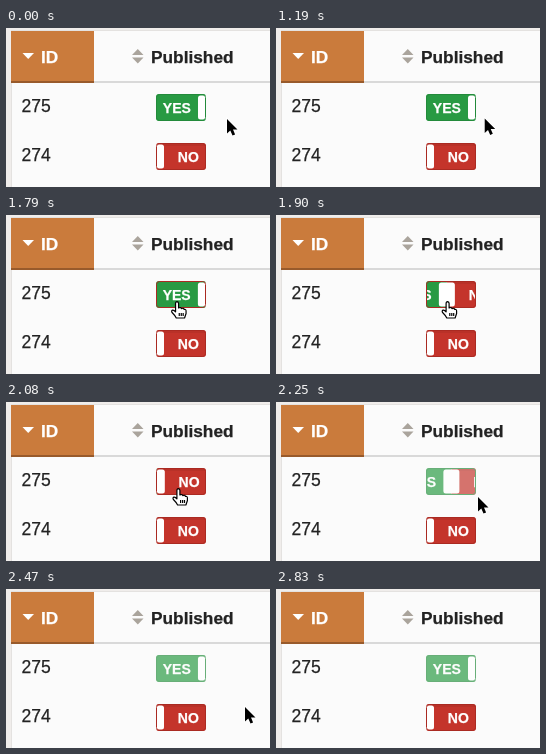
An HTML page for the animation above (4170 ms loop, 264 by 159 pixels).

```html
<!DOCTYPE html>
<html lang="en">
<head>
<meta charset="utf-8">
<title>Published toggle</title>
<style>
  html, body { margin: 0; width: 100%; height: 100%; overflow: hidden; }
  svg { display: block; width: 264px; height: 159px; }
  text { font: 17.5px "Liberation Sans", Arial, sans-serif; fill: #222; stroke: #222; stroke-width: .25px; }
  .head { font-size: 17.3px; font-weight: bold; }
  .label { font-size: 14px; font-weight: bold; }
  .white { fill: #fff; stroke: #fff; }
</style>
</head>
<body>
<svg viewBox="0 0 264 159">
  <defs>
    <clipPath id="pill"><rect width="50" height="27" rx="3"/></clipPath>
    <g id="slider">
      <rect x="-10" width="60" height="27" fill="#289a43"/>
      <rect x="50" width="60" height="27" fill="#c4342b"/>
      <rect x="50" width="60" height="3" fill="#000" opacity=".06"/>
      <text class="label white" x="6.8" y="18.5">YES</text>
      <text class="label white" x="71.8" y="18.5">NO</text>
      <rect x="42" y="1.5" width="16" height="24" rx="2.5" fill="#fff"/>
    </g>
  </defs>

  <rect width="264" height="159" fill="#f0edeb"/>
  <rect x="5" y="2" width="259" height="157" fill="#e4e2e0"/>
  <rect x="6" y="3" width="258" height="156" fill="#fbfbfb"/>
  <rect x="6" y="53" width="258" height="2" fill="#d9d9d9"/>
  <rect x="5" y="3" width="83" height="50" fill="#ca7b3c"/>
  <rect x="5" y="53" width="83" height="2" fill="#985a2b"/>

  <path d="M16.5 25H28L22.2 31Z" fill="#fff"/>
  <path d="M126 27H137.5L131.8 21ZM126 29.5H137.5L131.8 35.5Z" fill="#aaa49c"/>
  <text class="head white" x="35" y="35">ID</text>
  <text class="head" x="145" y="35">Published</text>
  <text x="15.6" y="84">275</text>
  <text x="15.6" y="133">274</text>

  <g id="first" transform="translate(150 66)">
    <g clip-path="url(#pill)"><use href="#slider" id="slide"/></g>
    <rect id="edge" x=".5" y=".5" width="49" height="26" rx="3" fill="none"/>
  </g>
  <g transform="translate(150 115)">
    <g clip-path="url(#pill)"><use href="#slider" x="-50"/></g>
    <rect x=".5" y=".5" width="49" height="26" rx="3" fill="none" stroke="#aa2a22"/>
  </g>

  <g id="cursor">
    <path id="arrow" d="M0 0V14.5L3.3 11.5L5.5 16.5L8.1 15.4L6 10.5H10.5Z"
      fill="#000" stroke="#fff" stroke-width="1.6" paint-order="stroke"/>
    <path id="hand" d="M-2 9V1.5Q-2-.3-.5-.3Q1 0 1 1.5V6Q3.3 4.8 3.9 6.6Q6.1 5.6 6.5 7.5Q8.5 7 8.5 9V11.5L7 16H-1.3Q-2.7 13.2-5.5 10.5Q-6.5 8.8-5 8.1Q-3.7 7.7-2 9.8ZM1.7 11V14M3.7 11V14M5.6 11V14"
      fill="#fff" stroke="#000" stroke-width="1.2" stroke-linejoin="round"/>
  </g>
</svg>
<script>
const LOOP = 4170, MOVE_AT = 1190, STEP = 58;
const SLIDE = 350, OFF_AT = 1768, ON_AT = 2130;
const $ = id => document.getElementById(id);

// Pointer path: time, x, y
const path = [[1070, 221, 91], [1480, 179, 89], [1650, 171, 87],
  [2080, 173, 87], [2234, 202, 95], [2466, 239, 118], [2814, 227, 163]];

function pointer(t) {
  const last = path.length - 1;
  const i = path.findIndex(p => p[0] > t);
  if (i < 1) return path[i ? last : 0].slice(1);
  const a = path[i - 1], b = path[i], k = (t - a[0]) / (b[0] - a[0]);
  return [a[1] + (b[1] - a[1]) * k, a[2] + (b[2] - a[2]) * k];
}

// CSS "ease": cubic-bezier(.25, .1, .25, 1)
function ease(x) {
  if (x <= 0) return 0;
  if (x >= 1) return 1;
  const bez = (s, a, b) => 3 * s * (1 - s) ** 2 * a + 3 * s * s * (1 - s) * b + s ** 3;
  let lo = 0, hi = 1;
  for (let i = 0; i < 20; i++) {
    const mid = (lo + hi) / 2;
    if (bez(mid, .25, .25) < x) lo = mid; else hi = mid;
  }
  return bez(lo, .1, 1);
}

function draw(t) {
  const off = ease((t - OFF_AT) / SLIDE) - ease((t - ON_AT) / SLIDE);
  const isOff = t >= OFF_AT && t < ON_AT;
  $("slide").setAttribute("x", -50 * off);
  $("edge").setAttribute("stroke", isOff ? "#aa2a22" : "#238a3b");
  $("first").setAttribute("opacity", t >= ON_AT ? .68 : 1);

  const [x, y] = pointer(t), over = x < 200;
  $("cursor").setAttribute("transform", `translate(${x} ${y})`);
  $("arrow").style.display = over ? "none" : "";
  $("hand").style.display = over ? "" : "none";
}

// The picture rests until MOVE_AT, then refreshes every STEP ms
const tick = t => t < MOVE_AT ? 0 : MOVE_AT + Math.floor((t - MOVE_AT) / STEP) * STEP;

const start = performance.now();
function frame() {
  draw(tick((performance.now() - start) % LOOP));
  requestAnimationFrame(frame);
}
frame();
</script>
</body>
</html>
```
